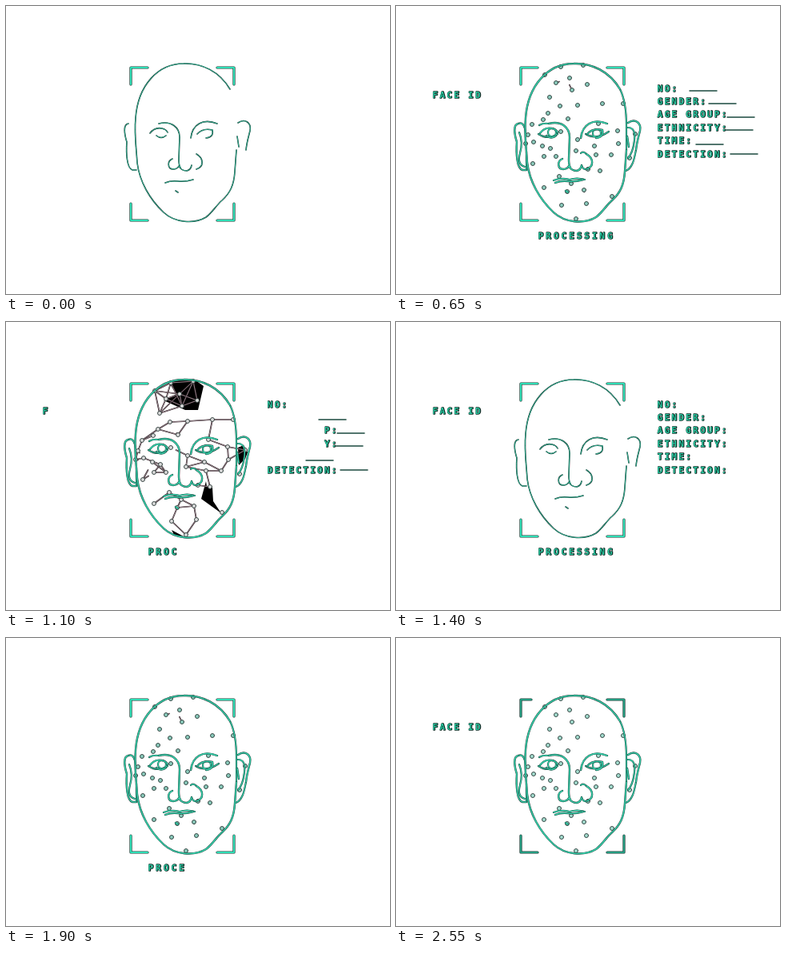
These frames come from a looping animation (480x360 px, 2.6 s). An HTML page with a canvas:

```html
<!DOCTYPE html>
<html lang="en">
<head>
<meta charset="utf-8">
<title>Face scan</title>
<style>
html, body { margin: 0; width: 100%; height: 100%; overflow: hidden; background: #fff; }
canvas { display: block; }
</style>
</head>
<body>
<canvas id="stage" width="480" height="360"></canvas>
<script>
const ctx = document.getElementById('stage').getContext('2d');
const LOOP = 2600, STEP = 50, SCAN = 1300;
const TEAL = '#35cfaa', DARK = '#14302a';
const clamp = v => Math.max(0, Math.min(1, v));
const ramp = (t, a, b) => clamp((t - a) / (b - a));

// Lines that stay visible during the whole scan
const core = new Path2D(`
  M280 104 C267 82 245 71 222 72 C190 72 165 99 162 140 C160 160 163 178 164 196
  C167 220 180 242 197 258 C211 271 235 273 250 264 C258 258 263 249 270 243
  C280 234 285 224 286 207 L288 180
  M153 147 C146 148 148 160 151 170 C150 184 151 203 158 205 L163 205
  M290 146 C299 140 307 146 305 156 C303 164 301 170 300 180 M289 163 L291 176
  M191 147 C207 143 217 152 217 164 L216 192 Q216 199 218 202
  M208 191 C201 194 202 204 209 204 Q214 204 216 200 Q219 206 226 206 Q231 205 232 199
  M238 185 C247 190 248 201 238 204
  M231 165 C233 148 246 140 264 147
  M180 159 Q186 151 195 153 Q200 154 202 158 M188 162 Q194 167 200 162
  M239 160 Q246 152 258 155 M250 165 Q260 164 258 155
  M199 221 Q206 218 215 219 T234 217 M212 231 L215 233`);

// Lines that fill in as the scan proceeds
const extra = new Path2D(`
  M280 104 Q288 120 288 150 L288 180
  M153 147 Q160 144 162 158 M163 182 L163 205
  M300 180 C298 190 296 203 287 206 M290 152 Q300 152 298 168 T290 190
  M154 158 Q159 170 155 184 T161 201
  M179 149 Q184 146 191 147 M178 160 Q190 168 202 160
  M190 158 a5 5 0 1 0 10 0 a5 5 0 1 0 -10 0
  M237 160 Q250 168 266 157 M246 159 a5 5 0 1 0 10 0 a5 5 0 1 0 -10 0
  M231 184 Q234 181 238 185 M232 199 Q234 205 238 204
  M197 218 Q207 214 217 217 Q226 214 236 217`);

const nodes = `200,96 217,90 234,74 239,98 220,105 192,114 227,124 258,122 190,134 215,141
  205,125 170,148 184,142 165,161 162,172 172,170 193,178 200,188 171,197 185,188
  183,175 225,181 227,167 248,175 269,186 277,156 253,147 278,172 250,186 255,206
  240,204 219,222 185,227 214,232 235,230 207,249 238,247 225,266 270,238 284,122
  206,157 204,213 186,86 299,160 292,190 206,76`.trim().split(/\s+/).map(p => p.split(',').map(Number));

let seed = 17;
const rnd = () => (seed = seed * 16807 % 2147483647) / 2147483647;

// Join near neighbours; the middle of the face is joined last
const edges = [];
const links = nodes.map(() => 0);
nodes.forEach((a, i) => nodes.forEach((b, j) => {
  const y = (a[1] + b[1]) / 2, most = y < 110 ? 6 : 3;
  const reach = y < 135 ? 35 : 26;
  if (j <= i || links[i] >= most || links[j] >= most) return;
  if (Math.hypot(a[0] - b[0], a[1] - b[1]) > reach) return;
  links[i]++;
  links[j]++;
  edges.push({ a, b, at: rnd() * .45 + (y > 132 && y < 205 ? .4 : .05) });
}));

const patches = [
  [950, 'M205 77 Q221 70 237 74 L241 96 L217 90 Z'],
  [1050, 'M204 76 Q222 70 237 73 L247 80 L240 110 L224 110 L197 98 L213 90 Z'],
  [1050, 'M250 199 L251 206 L258 207 L259 224 L269 239 L244 221 Z'],
  [1050, 'M207 260 L222 268 L210 266 Z'],
  [950, 'M290 157 L297 154 L302 163 L299 171 L291 179 Z']
].map(([at, d]) => [at, new Path2D(d)]);

// label, baseline, value line start and height
const rows = [
  ['NO:', 107, 367, 106], ['GENDER:', 123, 391, 122], ['AGE GROUP:', 139, 414, 139],
  ['ETHNICITY:', 156, 412, 155], ['TIME:', 172, 375, 173], ['DETECTION:', 189, 418, 185]
];
// typing start, speed per character, erasing start
const passes = [[150, 35, 820], [1180, 20, 1500], [1930, 12, 2055]];

function ink(path, width, color, rim = .8, edge = DARK) {
  ctx.lineWidth = width + rim;
  ctx.strokeStyle = edge;
  ctx.stroke(path);
  ctx.lineWidth = width;
  ctx.strokeStyle = color;
  ctx.stroke(path);
}

function type(text, x, y, gap, from, to) {
  ctx.lineWidth = 1.4;
  ctx.strokeStyle = '#0b231d';
  ctx.fillStyle = '#27c49d';
  for (let i = Math.max(0, from); i < Math.min(text.length, to); i++) {
    ctx.strokeText(text[i], x + i * gap + 1, y);
    ctx.fillText(text[i], x + i * gap + .5, y);
  }
}

function drawFrame(t) {
  const late = t >= 2250;
  const path = new Path2D();
  const corner = (x, y, dx, dy, w) => {
    path.moveTo(x + dx * w, y);
    path.lineTo(x, y);
    path.lineTo(x, y + dy * 21);
  };
  corner(156, 77, 1, 1, late ? 13 : 21);
  corner(285, 77, -1, 1, 21);
  corner(156, 268, 1, -1, 21);
  corner(285, 268, -1, -1, 21);
  ink(path, 2, late ? '#249b80' : '#2fdcb4', 1.2);
}

function drawMesh(m) {
  const grow = m > 1200 ? 0 : ramp(m, 400, 600) * .08 + .92 * ramp(m, 550, 1120) ** 5;
  for (const [at, path] of patches) {
    if (m >= at && m <= 1200) {
      ctx.fillStyle = '#000';
      ctx.fill(path);
    }
  }
  for (const { a, b, at } of edges) {
    const k = clamp((grow - at) * 8);
    if (!k) continue;
    const line = new Path2D();
    line.moveTo(...a);
    line.lineTo(a[0] + (b[0] - a[0]) * k, a[1] + (b[1] - a[1]) * k);
    ink(line, .8, '#b09aa2', .9, '#20151a');
  }
  const size = ramp(m, 300, 600);
  if (!size) return;
  const pale = ramp(m, 700, 1050);
  ctx.fillStyle = m > 1200 ? '#a5dfd1' : `rgb(${140 + 80 * pale},${205 + 15 * pale},${190 + 30 * pale})`;
  ctx.strokeStyle = '#2b3937';
  ctx.lineWidth = .9;
  for (const [x, y] of nodes) {
    ctx.beginPath();
    ctx.arc(x, y, 2.5 * size, 0, 7);
    ctx.fill();
    ctx.stroke();
  }
}

function drawFace(m) {
  const full = ramp(m, 200, 500);
  const width = .8 + .8 * full;
  ctx.globalAlpha = full;
  ink(extra, width * .85, TEAL);
  ctx.globalAlpha = 1;
  ink(core, width, TEAL);
}

function drawRows(t) {
  const pass = passes.find(([start, , erase]) => t >= start && t < erase + 350);
  if (!pass) return;
  const [start, speed, erase] = pass;
  const typed = Math.floor((t - start) / speed);
  const gone = Math.max(0, Math.floor((t - erase) / 35));
  rows.forEach(([text, y, x, lineY], i) => {
    const sweeps = i > 0 && i < 4;
    const from = sweeps ? gone : i === 4 && gone > 7 ? text.length : 0;
    type(text, 326, y, 8.9, from, typed);
    if (t < start + 350 || (i === 0 && gone > 6)) return;
    ctx.lineWidth = 1.5;
    ctx.strokeStyle = '#1b4a3f';
    ctx.stroke(new Path2D(`M${x} ${lineY}h34`));
  });
}

function drawTitle(t) {
  let from = 0, to = 0;
  if (t < 1050) to = Math.floor((t - 150) / 60);
  else if (t < 1800) to = Math.ceil((t - 1075) / 40);
  else {
    to = 7;
    from = Math.ceil(7 - (t - 2230) / 35);
  }
  type('FACE ID', 45, 115, 8.9, from, to);
}

function drawStatus(t) {
  const start = t < 840 ? 50 : t < 1580 ? 840 : 1580;
  if (t < 2450) type('PROCESSING', 177, 291, 9.6, 0, Math.floor((t - start) / 55));
}

function render(now) {
  const t = Math.floor(now % LOOP / STEP) * STEP;
  const m = t % SCAN;
  ctx.fillStyle = '#fff';
  ctx.fillRect(0, 0, 480, 360);
  drawMesh(m);
  drawFace(m);
  drawFrame(t);
  drawTitle(t);
  drawRows(t);
  drawStatus(t);
}

ctx.lineCap = ctx.lineJoin = 'round';
ctx.font = 'bold 11px "DejaVu Sans Mono", monospace';
const begin = performance.now();
function tick() {
  render(performance.now() - begin);
  requestAnimationFrame(tick);
}
tick();
</script>
</body>
</html>
```
